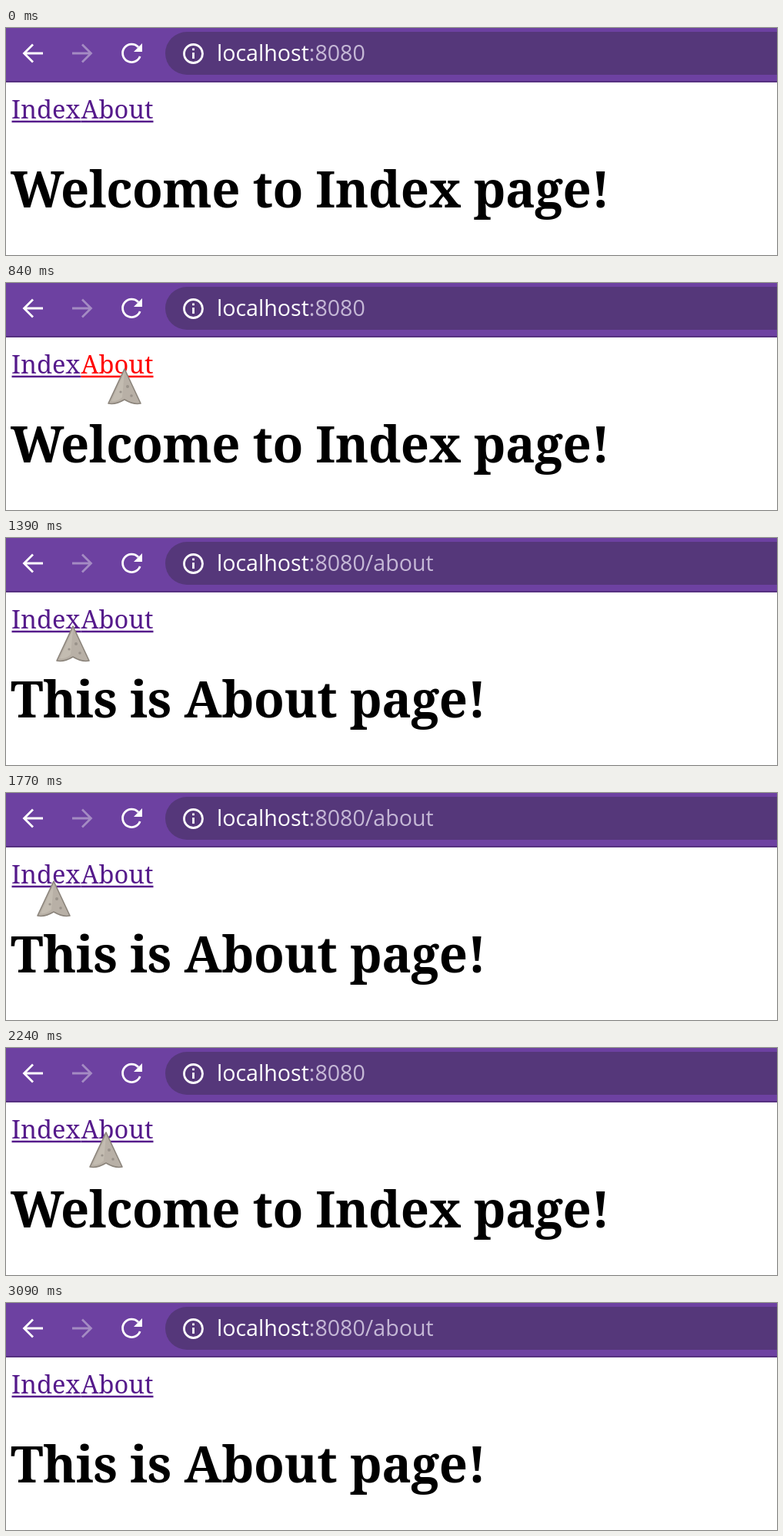
Animation of 1002 by 296 pixels, one loop 3.79 s. Source, as an HTML page:

```html
<!DOCTYPE html>
<html lang="en">
<head>
<meta charset="utf-8">
<title>Index and About</title>
<style>
  html, body { margin: 0; width: 100%; height: 100%; overflow: hidden; background: #fff; }
  svg { display: block; }
  .url { font: 28.6px "Open Sans", "Noto Sans", sans-serif; fill: #c5b8d6; }
  .host { font-weight: 500; fill: #fff; }
  .link { color: #551a8b; stroke: currentColor; stroke-width: 2.4; }
  .link text { font: 32.6px "Noto Serif", serif; fill: currentColor; stroke: none; }
  .pressed { color: #f00; }
  .title { font: 600 65px "Noto Serif", serif; letter-spacing: -.4px; }
  .icon { fill: none; stroke: #fff; stroke-width: 2.8; }
</style>
</head>
<body>
<svg width="1002" height="296" viewBox="0 0 1002 296">
  <rect width="1002" height="70" fill="#6d41a1"/>
  <rect y="69" width="1002" height="2" fill="#553080"/>
  <rect x="207" y="5" width="850" height="56" rx="28" fill="#55377a"/>

  <g class="icon">
    <path d="M48 33H24M35 21.5L23.5 33L35 44.5"/>
    <path d="M86 33H110M99 21.5L110.5 33L99 44.5" stroke="#a48bc3"/>
    <path d="M172 25A11.7 11.7 0 1 0 174.2 37"/>
    <path d="M177 20V31H166Z" fill="#fff" stroke="none"/>
    <circle cx="243.5" cy="33.5" r="12"/>
    <path d="M243.5 32V40M243.5 26.5V29.3"/>
  </g>
  <text class="url" x="274" y="43"><tspan class="host">localhost</tspan>:8080<tspan id="path"></tspan></text>

  <g class="link" id="index"><text x="7" y="118">Index</text><path d="M7.5 122H97.5"/></g>
  <g class="link" id="about"><text x="97.5" y="118">About</text><path d="M97.5 122H191.5"/></g>
  <text class="title" id="title" x="6" y="234"></text>

  <g id="cursor">
    <path d="M0 1L21 46Q12 48 0 41Q-12 48 -21 46Z" fill="#b8b0a6" stroke="#8b847b" stroke-width="1.6" stroke-linejoin="round"/>
    <path d="M0 5L-17 43Q-9 44 -3 38Z" fill="#c3bcb1"/>
    <g fill="#99928a">
      <circle cx="4" cy="24" r="2"/><circle cx="-5" cy="31" r="1.6"/><circle cx="9" cy="36" r="1.8"/>
    </g>
  </g>
</svg>
<script>
const LOOP = 3790, ENTER = 142, STEP = 77.37;
const $ = id => document.getElementById(id);

const linear = u => u;
const easeIn = u => u * u;
const easeOut = u => 1 - (1 - u) ** 1.5;

// The pointer moves in steps and rests between its moves.
const moves = [
  { from: 0, to: 7, x: 154, y: 111, ease: easeOut },
  { from: 12, to: 16, x: 87, y: 114, ease: linear },
  { from: 18, to: 21, x: 62, y: 114, ease: linear },
  { from: 24, to: 27, x: 130, y: 109, ease: easeIn },
  { from: 29, to: 31, x: 167, y: 109, ease: linear },
  { from: 34, to: 38, x: 230, y: 300, ease: easeIn }
];

function pointer(step) {
  let x = 519, y = 208;
  for (const m of moves) {
    const u = m.ease(Math.min(1, Math.max(0, (step - m.from) / (m.to - m.from))));
    x += (m.x - x) * u;
    y += (m.y - y) * u;
  }
  return [x, y];
}

function draw(t) {
  const step = Math.floor((t - ENTER) / STEP);
  $("cursor").setAttribute("transform", `translate(${pointer(step)})`);
  $("cursor").style.display = step < 0 ? "none" : "";

  const between = (from, to) => t >= from && t < to;
  const onAbout = between(930, 1930) || t >= 2780;
  $("path").textContent = onAbout ? "/about" : "";
  $("title").textContent = onAbout ? "This is About page!" : "Welcome to Index page!";

  $("about").classList.toggle("pressed", between(840, 930) || between(2700, 2780));
  $("index").classList.toggle("pressed", between(1850, 1930));
}

const start = performance.now();
function tick() {
  draw((performance.now() - start) % LOOP);
  requestAnimationFrame(tick);
}
tick();
</script>
</body>
</html>
```
